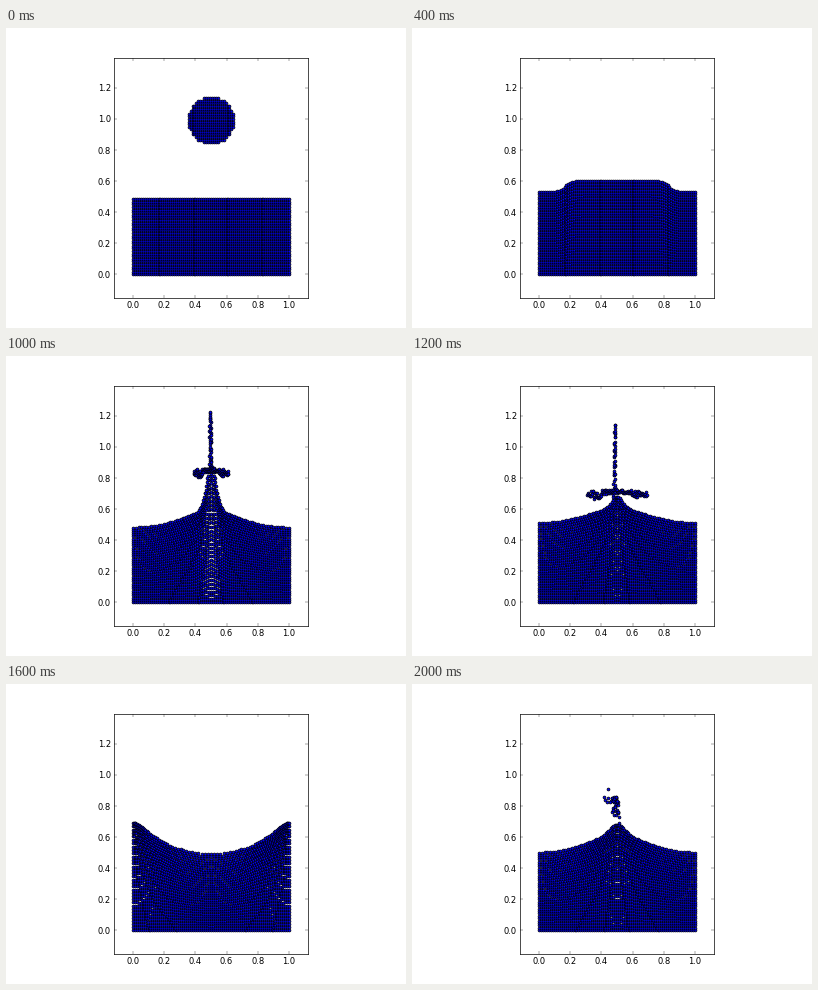
Recreate the animation shown at these times as a matplotlib script. Size 400 px wide and 300 px high, loop 2100 ms.

```python
import numpy as np
import matplotlib.pyplot as plt
from matplotlib.animation import FuncAnimation

plt.rcParams.update({
    "font.family": "DejaVu Sans", "font.size": 12, "text.hinting": "auto",
    "axes.linewidth": 1.0, "savefig.dpi": "figure",
    "xtick.direction": "in", "ytick.direction": "in",
    "xtick.top": True, "ytick.right": True,
    "xtick.major.size": 4, "ytick.major.size": 4,
    "xtick.major.width": 0.5, "ytick.major.width": 0.5,
    "xtick.major.pad": 4, "ytick.major.pad": 4,
    "xtick.labelsize": 12, "ytick.labelsize": 12,
})

FRAMES, STEP = 21, 100
DX, DY = 1 / 80, 1 / 60      # particle spacing
HALF_G = 4.9
WAVE = 2 * np.pi
IMPACT = .35                 # drop has joined the pool after this
NONE = np.empty((0, 2))


def pulse(t, peak, width):
    return np.exp(-((t - peak) / width) ** 2)


def arc(t, apex, peak):
    """Height of a ballistic path with its top at (peak, apex)."""
    return apex - HALF_G * (t - peak) ** 2


def slosh(t):
    """Signed height of the standing wave, positive when the middle is up."""
    return np.interp(t, [.4, .55, .7, 1, 1.15, 1.4, 1.6, 1.8, 2],
                     [0, -.12, -.01, .055, .06, 0, -.1, 0, .06])


def surface(d, t):
    """Water level at distance d from the middle; the volume stays constant."""
    amp = slosh(t)
    if t < IMPACT:
        mean, bump, width = .483, -.12 * pulse(t, .3, .05), .12
    elif t < 1.5:
        mean, bump, width = .56, .29 * pulse(t, 1, .17), .065
    else:
        mean, bump, width = .56, .06 * pulse(t, 2, .15), .1
    mean += np.pi * amp ** 2 - bump * width * np.sqrt(np.pi)
    shelf = .07 * pulse(t, .4, .08) if t > IMPACT else 0
    return (mean + amp * np.cos(WAVE * d) + bump * np.exp(-(d / width) ** 2)
            + shelf * (1 / (1 + np.exp((d - .335) / .02)) - .43))


def pool(t):
    rows = 30 if t < IMPACT else 34
    x, y = (a.ravel() for a in np.meshgrid(np.arange(81) * DX, np.arange(rows) * DY))
    top = y.max()
    level = surface(np.abs(x - .5), t)
    x = x - slosh(t) * np.sin(WAVE * (x - .5)) * np.exp(WAVE * (y - top))
    return np.c_[x, y + (level - top) * (y / top) ** 1.2]


def drop(t):
    if t > IMPACT:
        return NONE
    x, y = (a.ravel() for a in np.meshgrid((np.arange(24) - 11.5) * DX,
                                           (np.arange(18) - 8.5) * DY))
    inside = np.hypot(x, y) < .151
    return np.c_[.5 + x[inside], arc(t, .9917, 0) + y[inside]]


def jet(t):
    base, tip = surface(0, t), arc(t, 1.24, 1.06)
    if t < IMPACT or tip <= base:
        return NONE
    rng = np.random.default_rng(4)
    s = np.clip(np.linspace(0, 1, 42) + rng.normal(0, .02, 42), 0, 1)
    width = np.clip(.035 - .09 * (t - .7), .008, .035)
    late = np.clip((t - 1) / .4, 0, 1)
    x = (.495 + late * (.018 * s - .032)
         + width * np.sqrt(1 - .95 * s * s) * rng.uniform(-1, 1, 42))
    return np.c_[x, base + s * (tip - base)]


def umbrella(t):
    mid = arc(t, .85, 1.03)
    if mid < .6:
        return NONE
    rng = np.random.default_rng(9)
    q = np.linspace(-1, 1, 120)
    lobe = pulse(np.abs(q), .7, .2)
    y = mid + .018 - .012 * q * q - rng.random(120) * (.025 + .03 * lobe)
    return np.c_[.5 + (.11 + .4 * (t - 1)) * q, y]


def spray(t):
    base, top = surface(0, t), arc(t, .86, 2)
    if t < 1.75 or top <= base:
        return NONE
    rng = np.random.default_rng(12)
    grow = (t - 1.75) / .25
    s = np.sqrt(rng.random(34))
    stem = np.c_[.495 - .012 * s + .022 * rng.uniform(-1, 1, 34),
                 base + s * (top - base)]
    q = np.linspace(0, 1, 10)
    arm = np.c_[.5 - .085 * grow * q, top - .035 * rng.random(10) * grow]
    lone = [[.5 - .06 * grow, top + .05 * grow]]
    return np.vstack([stem, arm, lone])


def particles(k):
    return np.vstack([part(k / 10) for part in (pool, drop, jet, umbrella, spray)])


fig = plt.figure(figsize=(8, 6), dpi=50, facecolor="white")
ax = fig.add_axes([.125, .1, .775, .8])
ax.set_aspect("equal", adjustable="box")
ax.set_xlim(-.125, 1.125)
ax.set_ylim(-.152, 1.392)
ax.set_xticks(np.arange(6) * .2)
ax.set_yticks(np.arange(7) * .2)
dots = ax.scatter(*particles(0).T, s=17, c="blue",
                  edgecolors="black", linewidths=1.0)


def update(k):
    dots.set_offsets(particles(k))
    return dots,


anim = FuncAnimation(fig, update, frames=FRAMES, interval=STEP,
                     repeat=True, repeat_delay=0, blit=False)
plt.show()
```
